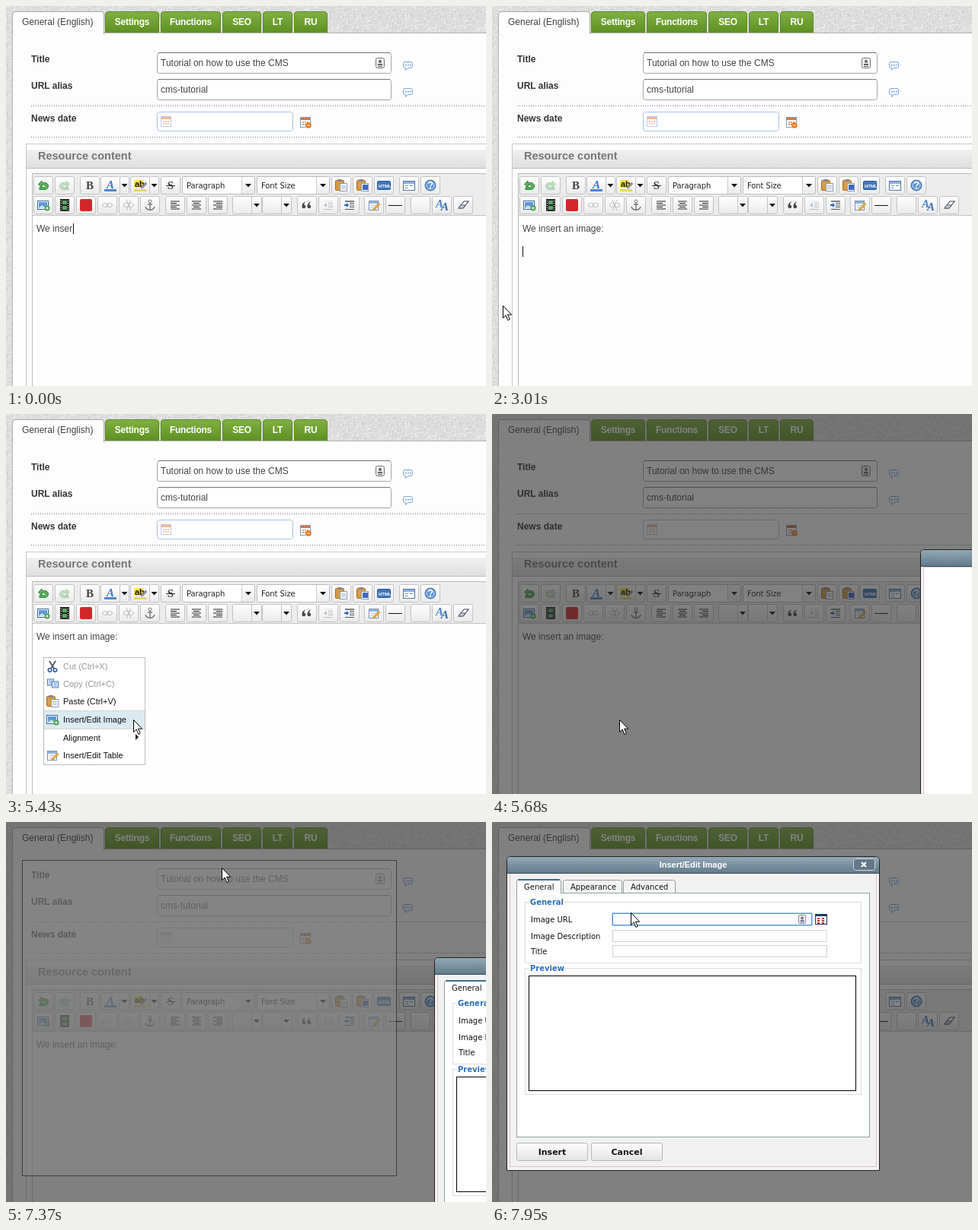
An HTML page for the animation above (8 s loop, 630x500 px).

```html
<!DOCTYPE html>
<html lang="en">
<head>
<meta charset="utf-8">
<title>Insert an image</title>
<style>
html, body { margin: 0; width: 100%; height: 100%; overflow: hidden; background: #dedede; }
svg { display: block; width: 630px; height: 500px; }
text { white-space: pre; font: 12px "Liberation Sans", Arial, sans-serif; fill: #444; }
.b { font-weight: bold; fill: #333; }
.tab { font-weight: bold; fill: #fff; letter-spacing: -.25px; text-anchor: middle; }
.head { font-size: 14.5px; font-weight: bold; fill: #777; }
.list { font: 10px "DejaVu Sans", Verdana, sans-serif; fill: #222; letter-spacing: -.1px; }
.serif { font: bold 15px "Liberation Serif", Times, serif; text-anchor: middle; }
.menu { font-size: 11px; fill: #111; }
.off { fill: #999; }
.dlg { font: 10px "DejaVu Sans", Verdana, sans-serif; fill: #111; }
.legend { font: bold 10px "DejaVu Sans", Verdana, sans-serif; fill: #2b6fb6; }
.btn { font: bold 11px "DejaVu Sans", Verdana, sans-serif; fill: #111; text-anchor: middle; }
.bar { font-size: 11px; font-weight: bold; fill: #fff; text-anchor: middle; }
</style>
</head>
<body>
<svg id="stage" viewBox="0 0 630 500" xmlns="http://www.w3.org/2000/svg"></svg>
<script>
const fill = (x, y, w, h, c, r = 0) =>
  `<rect x="${x}" y="${y}" width="${w}" height="${h}" rx="${r}" fill="${c}"/>`;
const box = (x, y, w, h, c, line, r = 0) =>
  `<rect x="${x + .5}" y="${y + .5}" width="${w - 1}" height="${h - 1}" rx="${r}" fill="${c}" stroke="${line}"/>`;
const path = (d, c = 'none', line = 'none', w = 1) =>
  `<path d="${d}" fill="${c}" stroke="${line}" stroke-width="${w}"/>`;
const label = (x, y, s, cls = '', more = '') => `<text x="${x}" y="${y}" class="${cls}" ${more}>${s}</text>`;
const group = (id, s) => `<g id="${id}">${s}</g>`;
const move = (x, y, s, more = '') => `<g transform="translate(${x} ${y}) ${more}">${s}</g>`;
const faint = s => `<g opacity=".35">${s}</g>`;
const grad = (id, a, b) =>
  `<linearGradient id="${id}" x2="0" y2="1"><stop stop-color="${a}"/><stop offset="1" stop-color="${b}"/></linearGradient>`;
const rows = (ys, f) => ys.map(f).join('');

// Linen-like page background
let seed = 7;
const rnd = n => (seed = seed * 16807 % 2147483647) % n;
function linen() {
  let s = fill(0, 0, 64, 64, '#dcdcdc');
  for (let i = 0; i < 420; i++) {
    const long = 1 + rnd(4), flat = rnd(2);
    s += fill(rnd(64), rnd(64), flat ? long : 1, flat ? 1 : long, i % 3 ? '#ececec' : '#cdcdcd');
  }
  return `<pattern id="linen" width="64" height="64" patternUnits="userSpaceOnUse">${s}</pattern>`;
}

// Icons are drawn around their own centre
const curve = path('M-6.5,-1.5L-2,-6V-3.5H2A4.5,4.5 0 0 1 2,5.5H-5V2.8H1.5A1.8,1.8 0 0 0 1.5,-.5H-2V3Z', '#59b35c', '#2f8637');
const bars = ws => ws.map((w, i) => fill(w < 0 ? 6 + w : -6, -5.5 + i * 2.5, Math.abs(w), 1, '#222')).join('');
const clip = box(-8, -7, 12, 14, '#d99b45', '#a66a1e', 1) + fill(-5, -8, 6, 3, '#888', 1);
const sheet = box(-2, -3, 10, 11, '#fff', '#8a9cb8');
const chain = box(-7, -3, 8, 6, 'none', '#555', 3) + box(-1, -3, 8, 6, 'none', '#555', 3);
const note = box(-7, -6, 13, 13, '#f8f8f2', '#7a93b8') + fill(-6, -5, 11, 3, '#8fb3e0') +
  fill(-4, 0, 6, 1, '#b5c3d8') + fill(-4, 3, 6, 1, '#b5c3d8') + path('M-1,5L6,-3L8,-1L1,6L-2,7Z', '#f2b544', '#b37a1c', .7);
const picture = box(-8, -6, 15, 12, '#fff', '#3c6498') + fill(-6, -4, 11, 8, '#5d97d6') +
  path('M-6,4L-2,0L1,2L3,1L5,4Z', '#c8dcf0') + `<circle cx="5" cy="4" r="3.5" fill="#45a047"/>` +
  fill(3, 3.5, 4, 1, '#fff') + fill(4.5, 2, 1, 4, '#fff');
const dent = faint(bars([12])) + fill(-6, 5, 12, 1, '#555') +
  rows([-3, -.5, 2], y => fill(0, y, 6, 1, '#555'));
const icon = {
  undo: curve,
  redo: faint(move(0, 0, curve, 'scale(-1 1)')),
  bold: label(0, 5, 'B', 'serif'),
  color: label(0, 4, 'A', 'serif', 'font-style="italic" style="fill:#3d7cc9;font-style:italic"') + fill(-8, 5, 16, 3, '#4d86cf'),
  mark: fill(-8, -7, 12, 10, '#fbe54a') + label(-7, 2, 'ab', 'menu b') + path('M1,3L7,-4L9,-2L3,4Z', '#999', '#666', .6) + fill(-8, 5, 16, 3, '#e3d96a'),
  strike: label(0, 5, 'S', 'serif') + fill(-6, 0, 12, 1, '#333'),
  paste: clip + sheet + rows([0, 2, 4], y => fill(0, y, 6, 1, '#a9b6cc')),
  pasteDoc: clip + sheet + fill(0, -1, 7, 7, '#3c68c4'),
  html: box(-9, -6, 18, 12, '#3f79be', '#27558f', 1) + label(-7, 3, 'HTML', '', 'style="font-size:6px;fill:#fff;font-weight:bold"'),
  form: box(-8, -6, 16, 13, '#fff', '#5478ab') + fill(-7, -5, 14, 3, '#8db1e0') + fill(-5, 0, 4, 1, '#6b8cc0') +
    fill(1, 0, 4, 1, '#6b8cc0') + fill(-5, 3, 4, 1, '#6b8cc0'),
  help: `<circle r="7" fill="#5f93d3" stroke="#3a6aa8"/><circle r="5" fill="none" stroke="#cfe0f5"/>` + label(0, 4, '?', 'tab'),
  picture,
  film: fill(-6, -8, 12, 16, '#222') + fill(-3, -6, 6, 5, '#58a868') + fill(-3, 1, 6, 5, '#58a868') +
    rows([-6, -3, 0, 3, 6], y => fill(-5, y, 1, 1, '#fff') + fill(4, y, 1, 1, '#fff')),
  video: fill(-8, -8, 16, 16, '#d3272b', 2),
  link: faint(chain),
  unlink: faint(chain + path('M-3,-7L3,7M3,-7L-3,7', 'none', '#555')),
  anchor: `<circle cy="-5" r="2" fill="none" stroke="#777"/>` + path('M0,-3V6M-3,-1H3M-6,2Q-5,6 0,6.5Q5,6 6,2', 'none', '#777', 1.4),
  left: bars([12, 8, 12, 8, 12]),
  center: bars([12, 0, 12, 0, 12]) + fill(-4, -3, 8, 1, '#222') + fill(-4, 2, 8, 1, '#222'),
  right: bars([12, -8, 12, -8, 12]),
  quote: rows([-5, 2], x => path(`M${x + 4},-5Q${x - 2},-3 ${x - 1.5},2A2.4,2.4 0 1 0 ${x + 1},-.6Q${x + 1},-3 ${x + 4},-5Z`, '#444')),
  outdent: faint(dent + path('M-6,0L-2,-3V3Z', '#2563b0')),
  indent: dent + fill(-6, -5.5, 12, 1, '#333') + path('M-1,0L-4,-3V-1H-7V1H-4V3Z', '#2563b0'),
  note,
  rule: fill(-9, 0, 18, 1, '#111'),
  blank: '',
  style: label(-3, 3, 'A', 'serif', 'style="fill:#4a86cf;font-style:italic"') + label(4, 7, 'A', 'serif', 'style="fill:#3a70b8;font-style:italic"'),
  eraser: path('M-6,4L1,-5H7L0,4Z', '#fff', '#445', 1.1) + path('M-6,4H0L3,0H-3Z', '#c3d2e8', '#445', .8),
  cut: path('M-4,-7L2,3M4,-7L-2,3', 'none', '#556', 1.8) +
    `<circle cx="-3.5" cy="5" r="2.2" fill="none" stroke="#2d5fa8" stroke-width="1.6"/><circle cx="3.5" cy="5" r="2.2" fill="none" stroke="#2d5fa8" stroke-width="1.6"/>`,
  copy: rows([-7, -1], x => box(x, x / 2 - 3, 9, 9, '#fff', '#4673b8') + rows([0, 2, 4], y => fill(x + 2, x / 2 - 1 + y, 5, 1, '#5f8fd6')))
};

const tool = (x, y, name) => box(x - 13, y - 12, 26, 24, 'url(#tool)', '#c3c3c3', 2) + move(x, y, icon[name]);
const down = (x, y) => path(`M${x - 4},${y - 2}H${x + 4}L${x},${y + 2.5}Z`, '#111');
const split = (x, y, w) => box(x, y - 12, w, 24, 'url(#tool)', '#c3c3c3', 2);
const list = (x, s) => box(x, 224, 96, 24, '#fff', '#bbb', 1) + fill(x + 79, 225, 16, 22, 'url(#tool)') +
  fill(x + 78, 225, 1, 22, '#ccc') + down(x + 87, 236) + label(x + 6, 240, s, 'list');

const tabs = [[130, 71, 'Settings'], [203, 79, 'Functions'], [284, 51, 'SEO'], [337, 39, 'LT'], [378, 44, 'RU']];
const tabShape = (x, y, w, h, c, line, r = 4) =>
  path(`M${x + .5},${y + h}V${y + r}q0,${.5 - r} ${r},${.5 - r}H${x + w - r - .5}q${r},0 ${r},${r - .5}V${y + h}`, c, line);
const badge = (x, y) => box(x, y, 12, 14, '#eee', '#777', 2) + `<circle cx="${x + 6}" cy="${y + 5}" r="2" fill="#666"/>` +
  fill(x + 3, y + 8, 6, 2, '#666') + fill(x + 3, y + 11, 6, 1, '#666');
const bubble = y => path(`M523.5,${y + .5}h8q2,0 2,2v4q0,2 -2,2h-4l-3,3v-3q-3,0 -3,-2v-4q0,-2 2,-2z`, '#f4f9ff', '#7ca6dc') +
  rows([524, 527, 530], x => fill(x, y + 4, 1.5, 1.5, '#6b97d2'));
const dots = y => `<line x1="33" x2="630" y1="${y + .5}" y2="${y + .5}" stroke="#777" stroke-dasharray="1 2"/>`;
const field = (x, y, w, h, line = '#a5a5a5') => box(x, y, w, h, '#fff', line, 3);
const calendar = box(-7, -7, 14, 14, '#fff', '#7d9cc8') + fill(-6, -6, 12, 3, '#e0743a') +
  rows([-1, 2], y => rows([-4, -1, 2], x => fill(x, y, 2, 2, '#e09a6a')));

const page =
  fill(0, 0, 630, 500, 'url(#linen)') +
  path('M8.5,501V39.5Q8.5,35.5 12.5,35.5H631V501Z', '#fdfdfd', '#b5b5b5') +
  tabShape(8, 7, 121, 30, '#fdfdfd', '#aaa') + label(21, 25, 'General (English)') +
  tabs.map(([x, w, s]) => tabShape(x, 7, w, 28, 'url(#green)', '#5d8a22') + label(x + w / 2, 25, s, 'tab')).join('') +
  label(33, 74, 'Title', 'b') + label(33, 109, 'URL alias', 'b') + label(33, 152, 'News date', 'b') +
  field(198, 61, 308, 28) + fill(200, 61, 304, 1, '#777') + field(198, 96, 308, 28) + fill(200, 96, 304, 1, '#777') +
  label(203, 79, 'Tutorial on how to use the CMS') + label(203, 114, 'cms-tutorial') +
  badge(485, 68) + bubble(73) + bubble(108) + dots(131) + dots(172) +
  field(198, 139, 179, 26, '#a9c3e4') + `<g opacity=".5">${move(210, 152, calendar)}</g>` +
  move(393, 153, calendar) + `<circle cx="397" cy="157" r="3.7" fill="#ee7a1b"/>` + fill(395, 156.5, 4, 1, '#fff') +
  box(26, 181, 620, 340, '#fdfdfd', '#c8c8c8') + fill(27, 189, 603, 24, 'url(#head)') + fill(27, 213, 603, 1, '#bbb') +
  label(42, 202, 'Resource content', 'head') +
  box(34, 220, 610, 300, '#fefefe', '#bbb') + fill(35, 221, 595, 54, '#ececec') + fill(35, 275, 595, 1, '#c4c4c4') +
  [[49, 'undo'], [77, 'redo'], [110, 'bold'], [216, 'strike'], [440, 'paste'], [468, 'pasteDoc'], [496, 'html'], [529, 'form'], [557, 'help']]
    .map(([x, n]) => tool(x, 236, n)).join('') +
  split(149, 236, 13) + split(188, 236, 13) + tool(137, 236, 'color') + tool(176, 236, 'mark') + down(155.5, 236) + down(194.5, 236) +
  list(231, 'Paragraph') + list(329, 'Font Size') +
  [[49, 'picture'], [77, 'film'], [105, 'video'], [133, 'link'], [161, 'unlink'], [189, 'anchor'], [222, 'left'], [250, 'center'],
    [278, 'right'], [395, 'quote'], [423, 'outdent'], [451, 'indent'], [483, 'note'], [511, 'rule'], [544, 'blank'], [572, 'style'], [600, 'eraser']]
    .map(([x, n]) => tool(x, 262, n)).join('') +
  [297, 336].map(x => split(x, 262, 39) + fill(x + 25, 251, 1, 22, '#c3c3c3') + down(x + 32, 262)).join('');

const menu = box(49, 320, 134, 142, '#fff', '#bdbdbd') +
  `<rect id="hover" x="50" width="132" height="23" fill="#dbeaf1"/>` +
  fill(50, 390, 132, 1, '#d5d5d5') + fill(50, 414, 132, 1, '#d5d5d5') +
  [[336, 'Cut (Ctrl+X)', 'cut', 1], [359, 'Copy (Ctrl+C)', 'copy', 1], [382, 'Paste (Ctrl+V)', 'paste'],
    [406, 'Insert/Edit Image', 'picture'], [430, 'Alignment', 'blank'], [453, 'Insert/Edit Table', 'note']]
    .map(([y, s, n, off]) => move(61, y - 4, icon[n]) + label(75, y, s, off ? 'menu off' : 'menu')).join('') +
  path('M170,421L174,425L170,429Z', '#111');

const fieldset = (y, h, s, w) => box(43, y, 442, h, 'none', '#dcdcdc') + fill(48, y - 3, w, 7, '#fff') + label(50, y + 4, s, 'legend');
const button = (x, s) => box(x, 422, 94, 24, 'url(#btn)', '#b8b8b8', 2) + label(x + 47, 438, s, 'btn');
const content = fill(24, 68, 480, 385, '#f2f1f1') +
  tabShape(93, 76, 78, 18, '#f4f4f4', '#919b9c', 3) + tabShape(172, 76, 69, 18, '#f4f4f4', '#919b9c', 3) +
  box(32, 93, 464, 322, '#fff', '#8fa3a3') + tabShape(32, 75, 59, 19, '#fff', '#919b9c', 3) + fill(34, 75, 55, 2, '#3f6d8c', 1) +
  label(42, 89, 'General', 'dlg') + label(103, 89, 'Appearance', 'dlg') + label(182, 89, 'Advanced', 'dlg') +
  fieldset(105, 81, 'General', 47) + fieldset(192, 167, 'Preview', 48) +
  label(51, 132, 'Image URL', 'dlg') + label(51, 154, 'Image Description', 'dlg') + label(51, 174, 'Title', 'dlg') +
  box(157, 119, 264, 18, '#fff', '#a9c8f5', 1) + box(158, 120, 262, 16, '#fff', '#5b92e5') +
  box(158, 142, 282, 16, '#fff', '#d2d2d2') + box(158, 162, 282, 16, '#fff', '#d2d2d2') +
  move(402, 122, badge(0, 0), 'scale(.85)') +
  box(424, 121, 16, 14, '#fff', '#1f3566') + fill(425, 122, 14, 2, '#1f3566') +
  rows([126, 129, 132], y => fill(427, y, 3, 2, '#b8342c') + fill(433, y, 3, 2, '#b8342c')) +
  box(48, 202, 430, 152, '#fff', '#000') + button(32, 'Insert') + button(130, 'Cancel');
const dialog = path('M19.5,458.5V51Q19.5,45.5 25,45.5H503Q508.5,45.5 508.5,51V458.5Z', '#f4f4f4', '#222') +
  path('M20,67V51Q20,46 25,46H503Q508,46 508,51V67Z', 'url(#bar)') + fill(20, 67, 488, 1, '#3d4c58') +
  box(23, 68, 482, 386, '#fff', '#d9c4c0') + group('content', content) +
  label(264, 60, 'Insert/Edit Image', 'bar') +
  box(474, 48, 29, 16, '#647888', '#cfd8df', 3) + path('M485,53L491,59M491,53L485,59', 'none', '#fff', 2);

const stage = document.getElementById('stage');
stage.innerHTML = `<defs>${linen() + grad('green', '#80b044', '#5e9020') + grad('head', '#f0f0f0', '#dfdfdf') +
  grad('tool', '#ffffff', '#eaeaea') + grad('bar', '#94a8b7', '#627b8c') + grad('btn', '#ffffff', '#e2e2e2')}</defs>` +
  page + label(40, 297, '', '', 'id="typed"') + fill(0, 0, 1, 14, '#111').replace('<rect', '<rect id="caret"') +
  group('menu', menu) + group('dim', fill(0, 0, 630, 500, 'rgba(45,45,45,.6)')) + group('dialog', dialog) +
  group('urlCaret', fill(160, 122, 1, 12, '#111')) +
  group('ghost', `<g opacity=".5">${box(0, 0, 492, 416, '#888', '#000')}</g>`) +
  group('arrow', path('M.5,.5V16.5L4.2,13L6.8,19.5L9.3,18.4L6.6,12.2H11.7Z', '#fff', '#000')) +
  group('beam', path('M-3,-7.5H-1L0,-6.5L1,-7.5H3M0,-6.5V6.5M-3,7.5H-1L0,6.5L1,7.5H3', 'none', '#222'));
const el = id => document.getElementById(id);
const show = (id, on) => el(id).setAttribute('visibility', on ? 'inherit' : 'hidden');
const place = (id, x, y) => el(id).setAttribute('transform', `translate(${x} ${y})`);

const LINE = 'We insert an image: ';
// [time, characters typed]
const typing = [[0, 8], [220, 9], [460, 11], [575, 13], [690, 15], [805, 17], [920, 18], [1150, 19], [1270, 20]];
// [time, x, y]
const mouse = [[0, -50, 0], [2780, 2, 412], [2900, 14, 394], [3020, 26, 371], [3140, 38, 349], [3260, 46, 331], [3380, 51, 322],
  [3630, 49, 321], [4090, 62, 334], [4210, 70, 343], [4330, 85, 356], [4450, 98, 370], [4570, 112, 384], [4690, 126, 394],
  [4810, 139, 401], [4930, 157, 402], [5060, 168, 402], [5430, 167, 402], [6050, 230, 385], [6170, 380, 330], [6300, 540, 270],
  [6420, 645, 225], [6910, 700, 160], [7030, 560, 118], [7140, 430, 90], [7260, 335, 68], [7370, 283, 60], [7490, 281, 56],
  [7610, 278, 72], [7730, 243, 92], [7840, 207, 109], [7950, 182, 119]];
const at = (table, t) => table.findLast(row => row[0] <= t);
const within = (t, a, b) => t >= a && t < b;

function draw(t) {
  const typed = el('typed'), caret = el('caret');
  typed.textContent = LINE.slice(0, at(typing, t)[1]);
  const newLine = t >= 1640;
  caret.setAttribute('x', newLine ? 40 : Math.round(40.6 + typed.getComputedTextLength()));
  caret.setAttribute('y', newLine ? 316 : 286);
  show('caret', t < 2100 || within(t, 2560, 3020));

  const [, x, y] = at(mouse, t), beam = within(t, 3140, 3630);
  place('arrow', x, y);
  place('beam', x + .5, y);
  show('arrow', !beam);
  show('beam', beam);

  show('menu', within(t, 3630, 5680));
  const hit = within(y, 391, 414) ? 391 : within(y, 368, 391) ? 367 : 0;
  el('hover').setAttribute('y', hit);
  show('hover', hit && within(t, 3630, 5680));

  show('dim', t >= 5680);
  show('dialog', t >= 5680);
  show('content', t >= 6170);
  t < 7490 ? place('dialog', 543, 133) : place('dialog', 0, 0);
  show('ghost', within(t, 6910, 7490));
  place('ghost', x - 262, y - 10);
  show('urlCaret', within(t, 7610, 7840));
}

const start = performance.now();
function tick() {
  draw((performance.now() - start) % 8000);
  requestAnimationFrame(tick);
}
tick();
</script>
</body>
</html>
```
